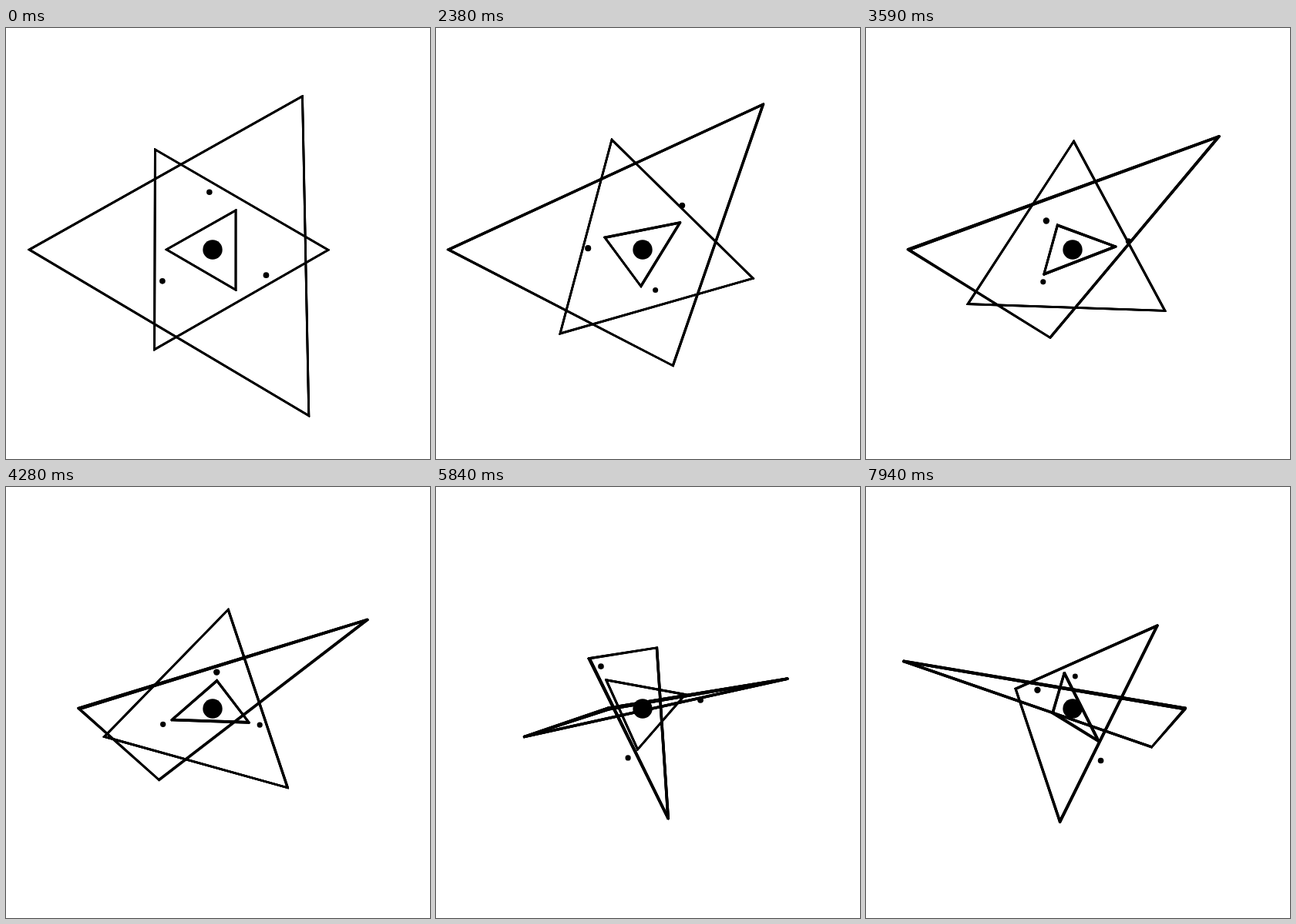
An HTML page with a canvas for the animation above (7990 ms loop, 550x560 px).

```html
<!DOCTYPE html>
<html lang="en">
<head>
<meta charset="utf-8">
<title>Nested triangles</title>
<style>
  html, body { margin: 0; width: 100%; height: 100%; overflow: hidden; background: #fff; }
  canvas { display: block; }
</style>
</head>
<body>
<canvas id="stage" width="550" height="560"></canvas>
<script>
const ctx = document.getElementById('stage').getContext('2d');
const LOOP = 7.99;              // seconds
const CENTER = [268, 288];
const EYE = 650;                // viewer distance
const SPEED = 14.5;             // degrees per second
const TUBE = 1.25, SIDES = 6;
const rad = degrees => degrees * Math.PI / 180;

// Tilt about x, then turn about y, applied `times` times over.
function spin([x, y, z], tilt, turn, times) {
  const ca = Math.cos(tilt), sa = Math.sin(tilt);
  const cb = Math.cos(turn), sb = Math.sin(turn);
  for (let i = 0; i < times; i++) {
    [y, z] = [y * ca - z * sa, y * sa + z * ca];
    [x, z] = [x * cb + z * sb, z * cb - x * sb];
  }
  return [x, y, z];
}

function project([x, y, z]) {
  const scale = EYE / (EYE - z);
  return [CENTER[0] + x * scale, CENTER[1] + y * scale, scale];
}

function dot(x, y, radius) {
  ctx.beginPath();
  ctx.arc(x, y, radius, 0, 2 * Math.PI);
  ctx.fill();
}

// A torus with three segments: one ring of tube points at each corner.
function triangle(radius, place) {
  const rings = [0, 1, 2].map(corner => {
    const angle = rad(120 * corner);
    return Array.from({ length: SIDES }, (_, side) => {
      const around = 2 * Math.PI * side / SIDES;
      const r = radius + TUBE * Math.cos(around);
      return place([r * Math.cos(angle), r * Math.sin(angle), TUBE * Math.sin(around)]);
    });
  });
  rings.forEach((ring, corner) => {
    const next = rings[(corner + 1) % 3];
    for (let side = 0; side < SIDES; side++) {
      const other = (side + 1) % SIDES;
      ctx.beginPath();
      for (const [x, y] of [ring[side], ring[other], next[other], next[side]]) ctx.lineTo(x, y);
      ctx.closePath();
      ctx.fill();
      ctx.stroke();
    }
  });
}

function draw(time) {
  const tilt = rad(172.9 + SPEED * time);
  const turn = rad(178.6 + SPEED * time);
  const placer = times => point => project(spin(point, tilt, turn, times));

  ctx.fillStyle = '#fff';
  ctx.fillRect(0, 0, 550, 560);
  ctx.fillStyle = ctx.strokeStyle = '#000';
  ctx.lineWidth = 1.5;
  ctx.lineJoin = 'round';

  [240, 150, 60].forEach((radius, depth) => triangle(radius, placer(depth + 1)));

  for (let i = 0; i < 3; i++) {
    const angle = rad(119 * i - 32.5 + SPEED / 2 * time);
    const [x, y, scale] = placer(3)([76.5 * Math.cos(angle), 76.5 * Math.sin(angle), 0]);
    dot(x, y, 3.8 * scale);
  }
  dot(...CENTER, 12.7);
}

const start = performance.now();
function frame() {
  draw((performance.now() - start) / 1000 % LOOP);
  requestAnimationFrame(frame);
}
frame();
</script>
</body>
</html>
```
